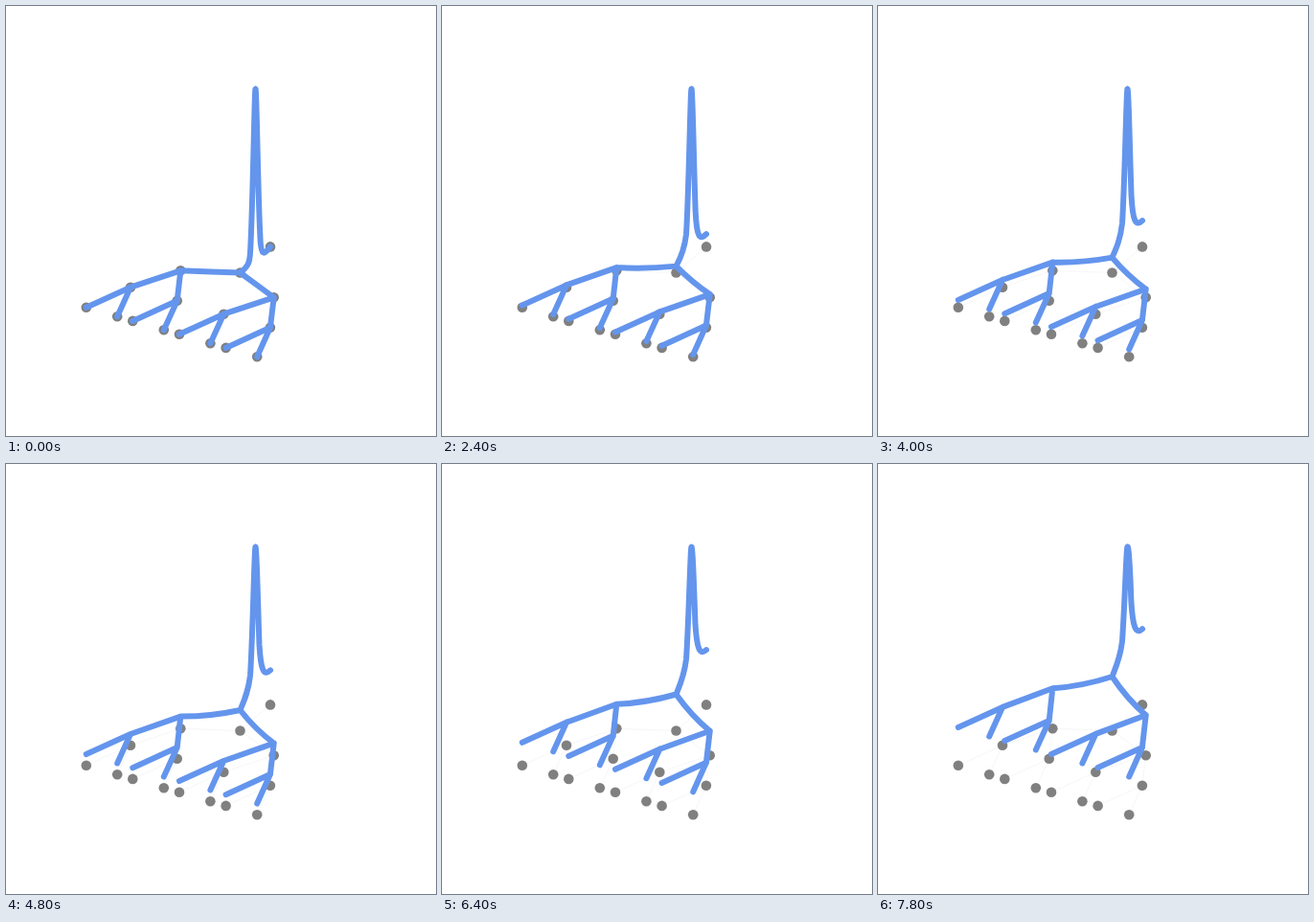
Animation, 449 px wide and 449 px high, one loop 8 s. Source, as an HTML page:

```html
<!DOCTYPE html>
<html lang="en">
<head>
<meta charset="utf-8">
<title>Lifting tree</title>
<style>
  html, body { margin: 0; width: 100%; height: 100%; overflow: hidden; background: #fff; }
  svg { display: block; width: 100%; height: 100%; }
  path { fill: none; stroke-linecap: round; stroke-linejoin: round; }
</style>
</head>
<body>
<svg viewBox="0 0 449 449">
  <path id="rest" stroke="#f7f7f7" stroke-width="1"/>
  <g id="dots" fill="#808080"/>
  <path id="tree" stroke="#6495ed" stroke-width="6"/>
</svg>
<script>
const LOOP = 8000, STEP = 200;
const TIP = [260.5, 86.7];

// x, y, parent, motion group
const nodes = [
  [276, 251.4, 1, 'end'],
  [244.5, 278.5, -1, 'hub'],
  [182.3, 276.3, 1, 'mid'],
  [279.7, 304.3, 1, 'mid'],
  [130, 293.7, 2, 'leaf'],
  [178.7, 307.8, 2, 'leaf'],
  [83.8, 314.8, 4, 'leaf'],
  [116.2, 324.2, 4, 'leaf'],
  [132.3, 328.9, 5, 'leaf'],
  [164.8, 338.3, 5, 'leaf'],
  [227.3, 321.7, 3, 'leaf'],
  [275.9, 335.8, 3, 'leaf'],
  [181, 342.8, 10, 'leaf'],
  [213.4, 352.2, 10, 'leaf'],
  [229.6, 356.9, 11, 'leaf'],
  [262.2, 366.3, 11, 'leaf']
];

// Height gained by each group at the given steps
const keys = [0, 8, 16, 24, 28, 32, 39];
const lift = {
  end: [0, 8, 19.5, 36, 46, 57.3, 79.2],
  hub: [0, 3.6, 11, 21.5, 29, 38, 56.5],
  mid: [0, 1.6, 5.5, 12.7, 18.2, 25.5, 42],
  leaf: [0, 0.8, 4.5, 11.7, 17.3, 24, 39.8]
};

const $ = id => document.getElementById(id);
const mix = (a, b, s) => a + (b - a) * s;
const pt = p => p.map(v => v.toFixed(2)).join(' ');
const move = p => 'M' + pt(p);
const line = (a, b) => move(a) + 'L' + pt(b);
const curve = (...p) => 'C' + p.map(pt).join(' ');

function slope(v, i) {
  const a = Math.max(i - 1, 0), b = Math.min(i + 1, keys.length - 1);
  return (v[b] - v[a]) / (keys[b] - keys[a]);
}

function sample(v, n) {
  let i = 0;
  while (i < keys.length - 2 && n > keys[i + 1]) i++;
  const h = keys[i + 1] - keys[i], u = (n - keys[i]) / h;
  const w = u * u * (3 - 2 * u);
  return mix(v[i], v[i + 1], w)
    + h * u * (1 - u) * ((1 - u) * slope(v, i) - u * slope(v, i + 1));
}

// Edge with its two inner control points pushed off the chord
function bent(a, b, dx, dy) {
  const at = s => [mix(a[0], b[0], s) + dx, mix(a[1], b[1], s) + dy];
  return move(a) + curve(at(1 / 3), at(2 / 3), b);
}

function spike(hub, end, fast, slow) {
  const left = [255, hub[1] - mix(20.5, 37, fast)];
  const right = [mix(265.3, 264.3, slow), end[1] + mix(-13, -30, slow)];
  return move(hub)
    + curve(
      [hub[0] + mix(8.5, 4, fast), hub[1] - mix(6.5, 10, fast)],
      [mix(254.3, 253, fast), left[1] + mix(10, 17, fast)],
      left)
    + curve([mix(258, 257.5, fast), left[1] - mix(53, 35, fast)], [259.4, 84], TIP)
    + curve([261.6, 84], [263.3, right[1] - 35], right)
    + curve([266, end[1] + mix(11, -3, slow)], [269, end[1] + mix(9, 6, slow)], end);
}

function draw(n) {
  const pos = nodes.map(([x, y, , g]) => [x, y - sample(lift[g], n)]);
  const fast = 1 - Math.exp(-n / 8), slow = 1 - Math.exp(-n / 14);
  let d = spike(pos[1], pos[0], fast, slow)
    + bent(pos[2], pos[1], 0, 2.8 * slow)
    + bent(pos[1], pos[3], -1.5 * slow, 2.2 * slow);
  for (let i = 4; i < nodes.length; i++) d += line(pos[nodes[i][2]], pos[i]);
  $('tree').setAttribute('d', d);
}

$('rest').setAttribute('d', nodes.filter(n => n[2] >= 0)
  .map(n => line(nodes[n[2]].slice(0, 2), n.slice(0, 2))).join(''));
$('dots').innerHTML = nodes.map(([x, y]) => `<circle cx="${x}" cy="${y}" r="5.3"/>`).join('');

const start = performance.now();
function tick() {
  const t = (performance.now() - start) % LOOP;
  draw(Math.floor(t / STEP));
  requestAnimationFrame(tick);
}
tick();
</script>
</body>
</html>
```
